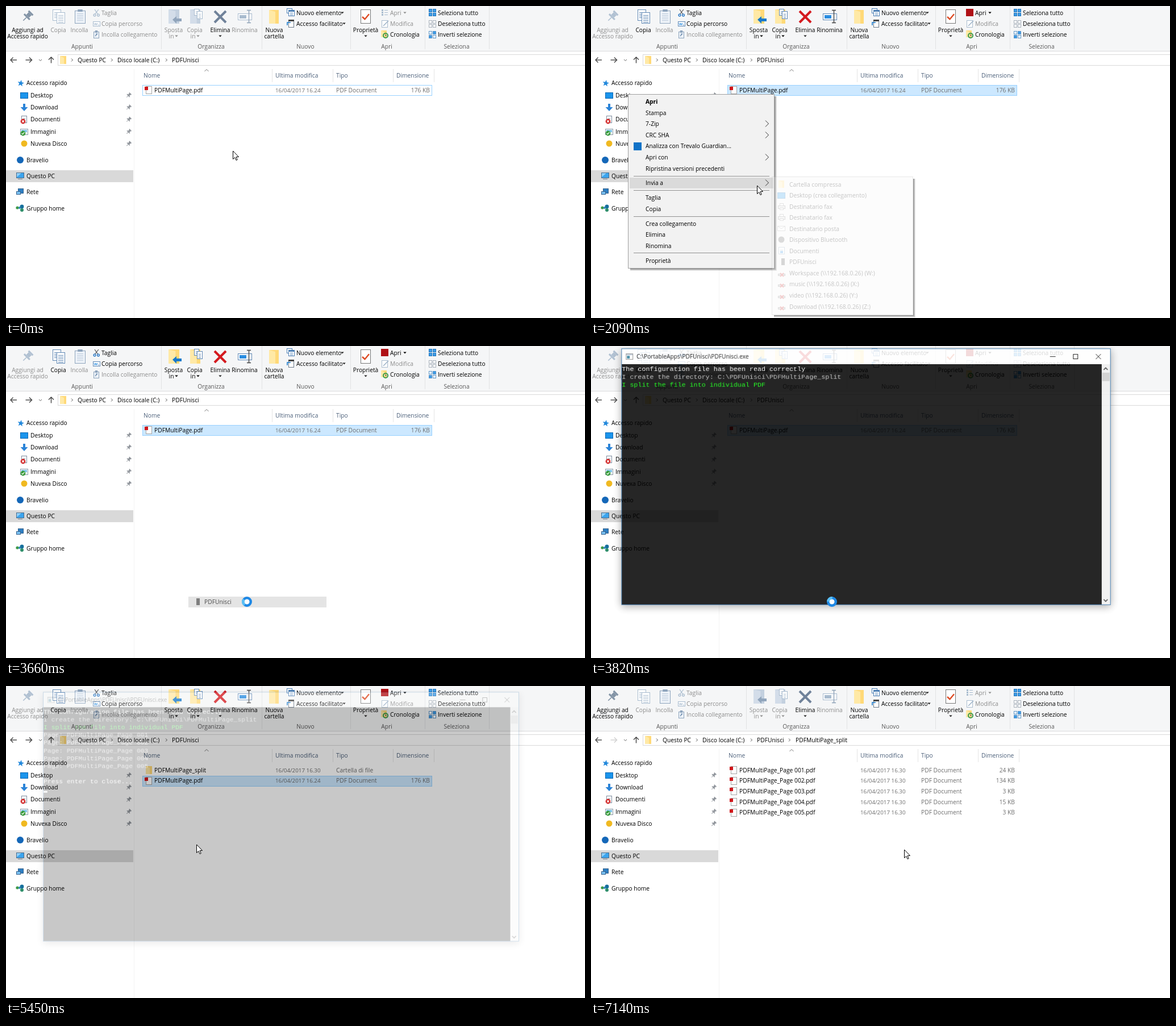
An HTML page with a canvas that plays this animation: 1019 px wide and 549 px high, repeating every 7310 ms.

```html
<!DOCTYPE html>
<html lang="it">
<head>
<meta charset="utf-8">
<title>PDFUnisci</title>
<style>
html, body { margin: 0; width: 1019px; height: 549px; overflow: hidden; background: #fff }
canvas { display: block }
</style>
</head>
<body>
<canvas id="stage" width="1019" height="549"></canvas>
<script>
const W = 1019, H = 549, LOOP = 7310;
const stage = document.getElementById('stage');
const scratch = Object.assign(document.createElement('canvas'), { width: W, height: H });
const screen = stage.getContext('2d');
let g = screen;

// Drawing helpers
const SANS = '"Open Sans", "Noto Sans", sans-serif', MONO = '"Liberation Mono", monospace';
const GREY = '#8d8d8d', BLUE = '#2b8de0', PALE = '#a9bccf', YELLOW = '#ffd978';

function rect(x, y, w, h, fill, stroke) {
  if (fill) { g.fillStyle = fill; g.fillRect(x, y, w, h); }
  if (stroke) { g.strokeStyle = stroke; g.lineWidth = 1; g.strokeRect(x + .5, y + .5, w - 1, h - 1); }
}
function trace(pts) {
  g.beginPath();
  for (let i = 0; i < pts.length; i += 2) g.lineTo(pts[i], pts[i + 1]);
}
function poly(fill, ...pts) { trace(pts); g.fillStyle = fill; g.fill(); }
function line(color, width, ...pts) { trace(pts); g.strokeStyle = color; g.lineWidth = width; g.stroke(); }
function disc(x, y, r, fill) { g.beginPath(); g.arc(x, y, r, 0, 7); g.fillStyle = fill; g.fill(); }
function ring(x, y, r, color, width = 1, from = 0, to = 7) {
  g.beginPath(); g.arc(x, y, r, from, to); g.strokeStyle = color; g.lineWidth = width; g.stroke();
}
function text(s, x, y, color = '#000', align = 'left', font = '10.25px ' + SANS) {
  g.font = font; g.textAlign = align; g.fillStyle = color;
  g.fillText(s, x, Math.round(y + 3.6));
}
const down = (x, y, color = '#222') => poly(color, x - 2.7, y - 1.4, x + 2.7, y - 1.4, x, y + 1.6);
const chevron = (x, y, s, color, w = 1) => line(color, w, x, y - s, x + s, y, x, y + s);
const cross = (x, y, r, color, w) => { line(color, w, x - r, y - r, x + r, y + r); line(color, w, x + r, y - r, x - r, y + r); };
const check = (x, y, s, color, w) => line(color, w, x - s, y, x - s / 4, y + s * .7, x + s, y - s * .8);

// Draws a group as one translucent, optionally scaled picture
function group(alpha, scale, cx, cy, draw) {
  if (!alpha) return;
  g = scratch.getContext('2d');
  g.clearRect(0, 0, W, H);
  draw();
  g = screen;
  g.save();
  g.globalAlpha = alpha;
  g.translate(cx, cy); g.scale(scale, scale); g.translate(-cx, -cy);
  g.drawImage(scratch, 0, 0);
  g.restore();
}

// Timing helpers
const hold = (t, ...keys) => keys.reduce((v, [at, value]) => t >= at ? value : v, 0);
const START = [399, 255];
const MOVES = [ // from, to, steps, points
  [70, 380, 5, [323, 154]],
  [1230, 1720, 7, [319, 210], [292, 316]],
  [2410, 2800, 6, [335, 318], [375, 390], [418, 463]],
  [3040, 3180, 3, [424, 451]],
  [4360, 5060, 10, [325, 300], [228, 153], [335, 279]],
  [5910, 6300, 6, [342, 147]],
  [6750, 7140, 6, [551, 288]]];

function pointer(t) {
  let pos = START;
  for (const [from, to, steps, ...pts] of MOVES) {
    if (t < from) break;
    const p = Math.min(1, (Math.floor((t - from) / (to - from) * (steps - 1) + 1e-6) + 1) / steps);
    const path = [pos, ...pts], u = p * p * (3 - 2 * p) * pts.length;
    const i = Math.min(pts.length - 1, Math.floor(u)), [a, b] = [path[i], path[i + 1]];
    pos = a.map((v, k) => Math.round(v + (b[k] - v) * (u - i)));
  }
  return pos;
}

// Icons
function pin(x, y, s, color) {
  g.save(); g.translate(x, y); g.rotate(Math.PI / 4); g.scale(s, s);
  rect(-3.5, -6, 7, 2, color); rect(-2.3, -4, 4.6, 4, color);
  rect(-4.5, 0, 9, 2, color); rect(-.5, 2, 1, 5, color);
  g.restore();
}
function page(x, y, w, h, edge, rows) {
  rect(x, y, w, h, '#fff', edge);
  for (let i = 0; i < (rows || 0); i++) rect(x + 3, y + 5 + i * 3, w - 6, 1, edge);
}
function folder(x, y, w, h, on = true) {
  rect(x, y, w, h, on ? YELLOW : '#c3d0df');
  poly(on ? '#ffe9a6' : '#d3dde9', x, y, x + w * .65, y + 3, x + w * .65, y + h, x, y + h);
}
function clipboard(x, y, w, h) {
  rect(x, y, w, h, '#edf2f8', '#8fa5bd');
  rect(x + w * .28, y - 2, w * .44, 4, '#8fa5bd');
}
function tiles(x, y, fills, edge) {
  fills.forEach((f, i) => rect(x + i % 2 * 7, y + (i >> 1) * 7, 6, 6, f, edge));
}
function pdfIcon(x, y) {
  page(x + 2, y, 11, 14, '#a5a5a5');
  rect(x, y + 1, 6, 6, '#d0161b');
}
function monitor(x, y) {
  rect(x, y, 14, 10, '#3ba4ee', '#4a6b8a');
  poly('#8fd0fa', x + 1, y + 1, x + 9, y + 1, x + 1, y + 8);
  rect(x + 3, y + 11, 8, 1, '#6b7f92');
}
function printer(x, y) {
  rect(x, y + 4, 13, 6, '#d8d8d8', '#777');
  rect(x + 3, y, 7, 5, '#fff', '#888'); rect(x + 3, y + 8, 7, 4, '#fff', '#888');
}

function ribbon(on) {
  const ink = on ? '#000' : GREY, edge = on ? '#6189b5' : PALE;
  const small = (s, x, y, c) => text(s, x, y, c);
  const big = (x, c, ...rows) => rows.forEach((s, i) => text(s, x, 42 + 11 * i, c, 'center'));
  rect(0, 0, W, 79, '#f5f6f7'); rect(0, 79, W, 1, '#dadbdc');
  [273, 450, 606, 737, 850].forEach(x => rect(x, 0, 1, 76, '#e2e3e4'));
  [['Appunti', 134], ['Organizza', 361], ['Nuovo', 527], ['Apri', 670], ['Seleziona', 793]]
    .forEach(([s, x]) => text(s, x, 71, '#5a5a5a', 'center'));

  pin(38, 18, 1.55, on ? '#b1c1d2' : '#8394a6');
  big(38, on ? GREY : '#000', 'Aggiungi ad', 'Accesso rapido');
  page(82, 6, 15, 20, edge, 4); page(89, 11, 15, 20, edge, 5);
  big(92, ink, 'Copia');
  clipboard(121, 8, 19, 23);
  for (let i = 0; i < 5; i++) rect(125, 13 + i * 3, 11, 1, '#bccbdc');
  big(129, GREY, 'Incolla');
  line(on ? '#555' : PALE, 1.2, 156, 6, 162, 15); line(on ? '#555' : PALE, 1.2, 163, 6, 156, 15);
  ring(156, 16, 1.9, on ? '#1b6fc2' : PALE, 1.3); ring(162.5, 16, 1.9, on ? '#1b6fc2' : PALE, 1.3);
  small('Taglia', 168, 12, ink);
  rect(153, 27, 13, 9, '#fff', edge);
  line(on ? BLUE : PALE, 1, 155, 30, 156.5, 34, 158, 30, 159.5, 34, 161, 30);
  rect(162, 33, 2, 1, edge);
  small('Copia percorso', 168, 31, ink);
  clipboard(154, 45, 10, 12); line('#6c8bad', 1.2, 157, 53, 160.5, 49, 158, 49); small('Incolla collegamento', 168, 50, GREY);

  folder(286, 6, 19, 25, on);
  poly(on ? '#1979ca' : '#91a5bc', 293, 24, 300, 18, 300, 22, 309, 22, 309, 27, 300, 27, 300, 31);
  folder(324, 6, 18, 25, on); page(331, 5, 9, 12, edge, 2); page(336, 9, 10, 14, edge, 3);
  big(295, ink, 'Sposta'); big(332, ink, 'Copia');
  [291, 329].forEach(x => { text('in', x, 53, ink, 'center'); down(x + 9, 53, ink); });
  cross(377, 19, 10, on ? '#d41a1f' : '#70829a', 4);
  big(377, '#000', 'Elimina'); down(377, 53);
  rect(408, 13, 25, 12, '#fff', edge); rect(411, 16, 12, 6, on ? BLUE : PALE);
  line(on ? '#444' : '#8fa3b8', 1.4, 424, 7.5, 431, 7.5, 427.5, 7.5, 427.5, 29.5, 424, 29.5, 431, 29.5);
  big(420, ink, 'Rinomina');

  folder(463, 7, 17, 24); big(472, '#000', 'Nuova', 'cartella');
  page(494, 4, 10, 9, '#4c7fb5'); page(497, 7, 11, 11, '#4c7fb5', 2); rect(497, 7, 11, 3, '#4c7fb5');
  small('Nuovo elemento', 511, 12); down(592, 12);
  page(497, 25, 10, 13, '#6c7a89'); rect(497, 24, 10, 3, '#444'); line('#1979ca', 1.6, 495, 34, 495, 29, 501, 29);
  small('Accesso facilitato', 511, 31); down(595, 31);

  page(624, 6, 18, 25, '#777'); check(633, 19, 6, '#de4a22', 2.4);
  big(633, '#000', 'Proprietà'); down(633, 53);
  if (on) rect(660, 5, 13, 13, '#b01116');
  else for (let i = 0; i < 3; i++) { rect(661, 6 + i * 4, 3, 3, PALE); rect(666, 7 + i * 4, 6, 1, PALE); }
  small('Apri', 676, 12, ink); down(702, 12, ink);
  page(661, 25, 11, 13, PALE); line('#9fb3c8', 1.6, 664, 35, 673, 26); small('Modifica', 676, 31, GREY);
  folder(660, 43, 10, 12); ring(668, 52, 4, '#3c9b49', 2); line('#444', 1, 668, 50, 668, 52, 670, 52); small('Cronologia', 676, 50);

  tiles(744, 5, Array(4).fill('#3a9ae6'), '#2478be');
  tiles(744, 25, Array(4).fill('#fff'), '#a7b0ba');
  tiles(744, 44, ['#fff', '#3a9ae6', '#3a9ae6', '#fff'], '#5f97c8');
  ['Seleziona tutto', 'Deseleziona tutto', 'Inverti selezione'].forEach((s, i) => small(s, 760, 12 + 19.3 * i));
}

function addressBar(t) {
  const inside = t >= 6530, arrow = (x, d, c) => {
    line(c, 1.4, x - 5.5, 95, x + 5.5, 95);
    line(c, 1.4, x + d, 91 - .5, x + d * 5.5 / 1, 95, x + d, 99.5);
  };
  arrow(13.5, -1, '#444'); arrow(40, 1, inside ? '#cfcfcf' : '#444');
  line('#666', 1, 58, 94, 60.5, 96.5, 63, 94);
  line('#444', 1.4, 79.5, 100.5, 79.5, 90); line('#444', 1.4, 75, 94.5, 79.5, 90, 84, 94.5);
  rect(91, 85, W, 20, '#fff', '#d9d9d9');
  folder(95, 88, 11, 14);
  [[115, 'Questo PC'], [185, 'Disco locale (C:)'], [281, 'PDFUnisci']].forEach(([x, s]) => {
    chevron(x, 95, 2.5, '#555'); text(s, x + 11, 95);
  });
  if (t >= 6460) chevron(348, 95, 2.5, '#555');
  if (inside) text('PDFMultiPage_split', 360, 95);
}

function sidebar() {
  rect(0, 289, 224, 21, '#d9d9d9');
  rect(225, 111, 1, H, '#f3f3f3');
  [['Accesso rapido', 135], ['Bravelio', 271], ['Questo PC', 299], ['Rete', 327], ['Gruppo home', 356]]
    .forEach(([s, y]) => text(s, 36, y));
  ['Desktop', 'Download', 'Documenti', 'Immagini', 'Nuvexa Disco'].forEach((s, i) => {
    text(s, 43, 157 + 21.35 * i);
    pin(216, 157 + 21.35 * i, .75, '#8a8f96');
  });
  const star = [];
  for (let i = 0; i < 10; i++) {
    const a = i * Math.PI / 5 - 1.4, r = i % 2 ? 2.6 : 6;
    star.push(26 + r * Math.cos(a), 136 + r * Math.sin(a));
  }
  poly('#2389dc', ...star);
  rect(25, 152, 14, 11, '#1a94ec', '#0b68b4');
  poly('#2b84d8', 30, 172, 34, 172, 34, 178, 38.5, 178, 32, 185, 25.5, 178, 30, 178);
  page(27, 193, 10, 13, '#7f8ea0', 3); disc(30, 203, 4.4, '#d32a2a'); cross(30, 203, 1.7, '#fff', 1.3);
  page(25, 216, 14, 11, '#8a9aa8'); rect(27, 218, 10, 4, '#7fc4e8'); disc(30, 224, 4.4, '#3a9c3d'); check(30, 224, 2.4, '#fff', 1.2);
  disc(32, 242, 5.5, '#f0b921');
  disc(25, 271, 6, '#1467b8');
  monitor(18, 293);
  rect(21, 321, 10, 9, '#2d7fc4', '#35618c'); rect(18, 326, 8, 6, '#7bc2f2', '#35618c');
  disc(28, 353, 3.4, '#176f9c'); disc(20, 355, 2.6, '#3e9a48'); disc(28, 359, 3, '#2f8f6a'); disc(24, 355, 2, '#2a87bd');
}

function fileList(t, [mx, my]) {
  const head = '#4c607a', info = '#6d6d6d';
  [['Nome', 242], ['Ultima modifica', 474], ['Tipo', 581], ['Dimensione', 687]].forEach(([s, x]) => text(s, x, 122, head));
  [468, 575, 681, 753].forEach(x => rect(x, 111, 1, 23, '#e5e5e5'));
  line('#777', 1, 349.5, 115, 353, 111.5, 356.5, 115);

  const pdf = ['PDFMultiPage.pdf', '24', 'PDF Document', '176 KB'];
  let files = [pdf];
  if (t >= 5300) files = [['PDFMultiPage_split', '30', 'Cartella di file', ''], pdf];
  if (t >= 6530) files = t < 6600 ? [] : [24, 134, 3, 15, 3].map((kb, i) =>
    [`PDFMultiPage_Page 00${i + 1}.pdf`, '30', 'PDF Document', kb + ' KB']);
  const selected = hold(t, [0, -1], [540, 0], [5300, 1], [6300, 0], [6530, -1]);
  const free = t < 990 || t >= 5300;

  files.forEach(([name, minute, type, size], i) => {
    const top = Math.round(139 + 18.7 * i), y = 148 + 18.7 * i;
    const hover = free && mx < 750 && my >= top && my < top + 18.7;
    if (i === selected) rect(240, top, 510, 19, '#cce8ff', '#99d1ff');
    else if (hover) rect(240, top, 510, 19, '#e5f3ff');
    if (t < 540) rect(240, top, 510, 19, null, '#99d1ff');
    if (size) pdfIcon(244, top + 2); else folder(246, top + 2, 11, 14);
    text(name, 261, y);
    text('16/04/2017 16.' + minute, 474, y, info, 'left', '9.8px ' + SANS);
    text(type, 581, y, info);
    text(size, 746, y, info, 'right');
  });
}

// Context menus
const MENU = [['Apri', 168], ['Stampa', 188], ['7-Zip', 207, 1], ['CRC SHA', 227, 1],
  ['Analizza con Trevalo Guardian...', 246], ['Apri con', 266, 1], ['Ripristina versioni precedenti', 286],
  ['Invia a', 311, 1], ['Taglia', 337], ['Copia', 357], ['Crea collegamento', 383],
  ['Elimina', 402], ['Rinomina', 422], ['Proprietà', 448]];
const SEND_TO = ['Cartella compressa', 'Desktop (crea collegamento)', 'Destinatario fax', 'Destinatario fax',
  'Destinatario posta', 'Dispositivo Bluetooth', 'Documenti', 'PDFUnisci', 'Workspace (\\\\192.168.0.26) (W:)',
  'music (\\\\192.168.0.26) (X:)', 'video (\\\\192.168.0.26) (Y:)', 'Download (\\\\192.168.0.26) (Z:)'];
const sendY = i => 313.5 + 19.55 * i;

function menuShadow(x, y, w, h) {
  for (let i = 0; i < 4; i++) {
    const c = `rgba(0,0,0,${.42 - i * .11})`;
    rect(x + w + i, y + 4, 1, h - 4 + i, c);
    rect(x + 4, y + h + i, w - 4 + i + 1, 1, c);
  }
}
function mainMenu([mx, my]) {
  rect(65, 155, 258, 307, '#f2f2f2', '#a0a0a0');
  [299, 324, 370, 434].forEach(y => rect(75, y, 239, 1, '#919191'));
  MENU.forEach(([s, y, more], i) => {
    const hover = mx >= 321 ? my > 300 && s === 'Invia a' : Math.abs(my - y) < 9.8;
    if (hover) rect(68, y - 9, 253, 19, '#dadada');
    text(s, 96, y, '#000', 'left', `${i ? '' : 'bold '}10.25px ${SANS}`);
    if (more) chevron(307, y, 5.5, '#333');
  });
  rect(75, 240, 14, 14, '#1173c7');
}
function sendIcon(i, y) {
  if (i === 0) folder(330, y - 7, 10, 13);
  else if (i === 1) rect(328, y - 5, 14, 11, '#1a94ec', '#0b68b4');
  else if (i < 4) printer(329, y - 6);
  else if (i === 4) { rect(328, y - 5, 14, 9, '#fff', '#999'); line('#999', 1, 328, y - 5, 335, y, 342, y - 5); }
  else if (i === 5) disc(335, y, 5.5, '#5a5a5a');
  else if (i === 6) { page(330, y - 7, 11, 13, '#8299b0', 2); rect(333, y, 5, 4, BLUE); }
  else if (i === 7) rect(335, y - 6, 6, 12, '#4a4a4a');
  else { rect(329, y + 1, 13, 4, '#b5b5b5', '#777'); cross(336, y + 3, 3, '#d02020', 1.8); }
}
function sendRow(i, hover) {
  const y = Math.round(sendY(i));
  if (hover) rect(321, y - 9, 243, 19, '#dadada');
  sendIcon(i, y);
  text(SEND_TO[i], 349, y);
}
function sendMenu([mx, my]) {
  rect(318, 300, 249, 244, '#f2f2f2', '#a0a0a0');
  const row = mx >= 321 ? Math.floor((my - 303.7) / 19.55) : -1;
  SEND_TO.forEach((s, i) => sendRow(i, i === row));
}

// Console window
const OUTPUT = [['The configuration file has been read correctly', '#fff'],
  ['I create the directory: C:\\PDFUnisci\\PDFMultiPage_split', '#c0c0c0'],
  ['I split the file into individual PDF', '#0f0'],
  ...[1, 2, 3, 4, 5].map(n => ['Page: PDFMultiPage_Page 00' + n, '#c0c0c0']),
  ['', '#fff'], ['Press enter to close...', '#fff']];

function consoleWindow(t) {
  g.save();
  g.shadowColor = 'rgba(0,0,0,.4)'; g.shadowBlur = 14; g.shadowOffsetY = 3;
  rect(49, 2, 870, 456, '#2c6ea8');
  g.restore();
  rect(50, 3, 868, 27, '#fff');
  rect(50, 30, 853, 427, '#000');
  rect(903, 30, 15, 427, '#f0f0f0');
  rect(57, 11, 13, 11, '#fff', '#8a8a8a'); rect(58, 12, 11, 2, '#b9c7d6'); rect(59, 15, 5, 5, '#2f7f9c');
  text('C:\\PortableApps\\PDFUnisci\\PDFUnisci.exe', 76, 16);
  rect(811, 16, 10, 1, '#000'); rect(852, 12, 9, 9, null, '#000'); cross(897, 16.5, 4.5, '#000', 1);
  line('#333', 1.6, 906.5, 40, 910, 36.5, 913.5, 40); line('#333', 1.6, 906.5, 448, 910, 451.5, 913.5, 448);
  rect(904, 45, 13, 15, '#cdcdcd');
  const shown = hold(t, [3805, 3], [3880, 6], [3960, 10]);
  OUTPUT.slice(0, shown).forEach(([s, c], i) => text(s, 50, 38 + 14.2 * i, c, 'left', '11.82px ' + MONO));
  if (t >= 5300) rect(50, 183, 7, 3, '#fff');
  else if (t >= 3960 && (t < 4500 || t >= 5000)) rect(213, 169, 7, 3, '#fff');
}

function drawPointer(t, [x, y]) {
  if (t >= 3660 && t < 3960) {
    disc(424, 450, 5, '#fff');
    ring(424, 450, 6.8, '#1e88e5', 4.4);
    const a = (t - 3660) / 160 + 2.2;
    ring(424, 450, 6.8, '#5cc0f5', 4.4, a, a + 1.6);
    return;
  }
  g.save();
  g.translate(x + .5, y);
  trace([0, 0, 0, 14.5, 3.3, 11.5, 5.6, 16.5, 7.7, 15.5, 5.5, 10.7, 10, 10.5]);
  g.closePath();
  g.fillStyle = '#fff'; g.fill();
  g.strokeStyle = '#000'; g.lineWidth = 1; g.stroke();
  g.restore();
}

function draw(t) {
  const mouse = pointer(t);
  rect(0, 0, W, H, '#fff');
  ribbon(t >= 610 && t < 6530);
  addressBar(t);
  sidebar();
  fileList(t, mouse);

  const menu = hold(t, [990, .3], [1070, .7], [1150, 1], [3660, 0]);
  const send = hold(t, [2090, .22], [2165, .65], [2240, 1], [3660, 0]);
  if (menu) menuShadow(65, 155, 258, 307);
  group(menu, 1, 0, 0, () => mainMenu(mouse));
  if (send) menuShadow(318, 300, 249, 244);
  group(send, 1, 0, 0, () => sendMenu(mouse));
  group(hold(t, [3660, .7], [3730, .35], [3805, 0]), 1, 0, 0, () => sendRow(7, true));

  const alpha = hold(t, [3730, .35], [3805, .85], [3880, 1], [5380, .65], [5450, .215], [5530, 0]);
  const scale = hold(t, [3730, .965], [3805, .99], [3880, 1], [5380, .985], [5450, .963]);
  group(alpha, scale, 483, 229, () => consoleWindow(t));
  drawPointer(t, mouse);
}

function tick() {
  draw(performance.now() % LOOP);
  requestAnimationFrame(tick);
}
tick();
</script>
</body>
</html>
```
